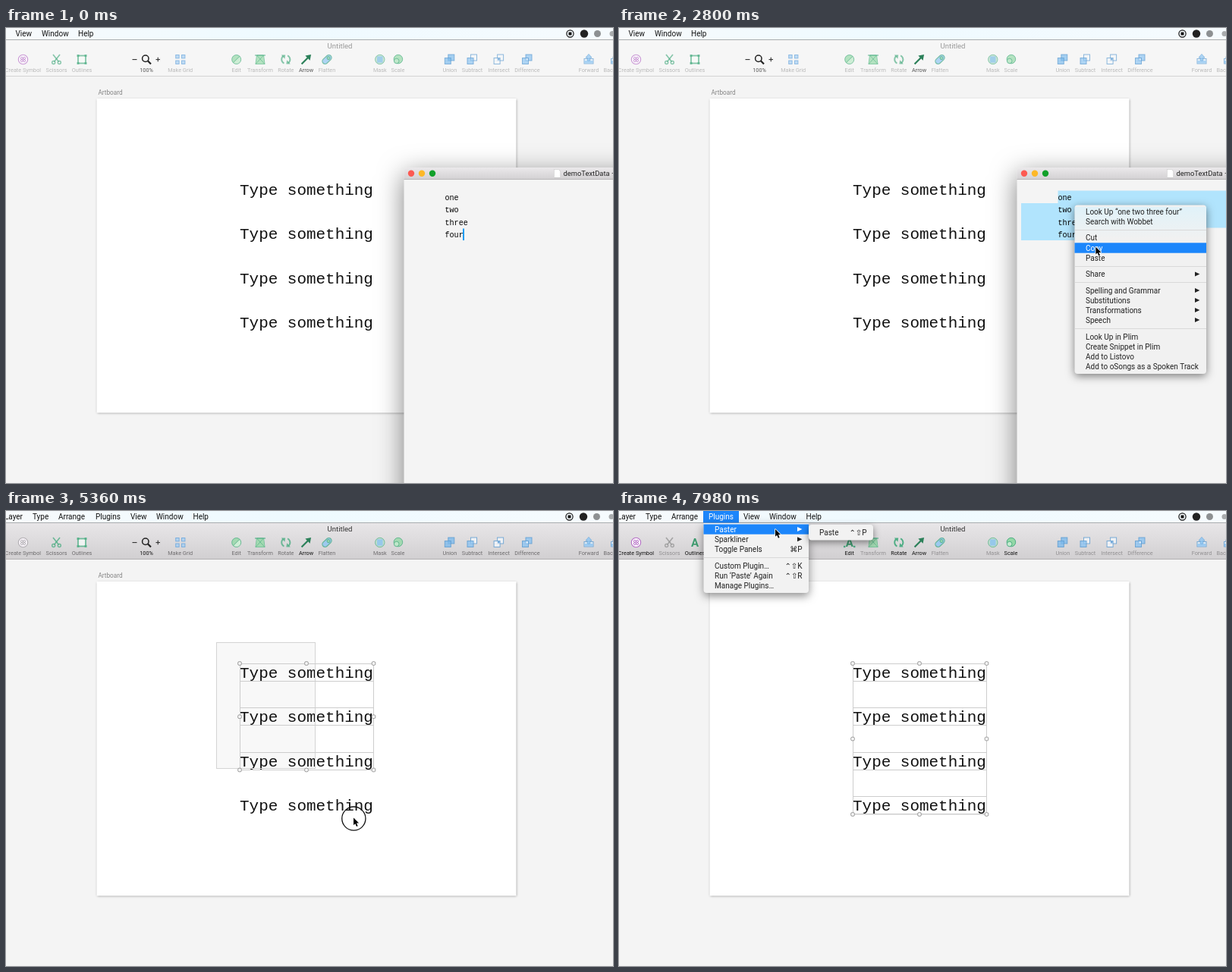
Recreate the animation shown at these times as an HTML page with a canvas. Size 800 by 600 pixels, loop 8 s.

```html
<!DOCTYPE html>
<html lang="en">
<head>
<meta charset="utf-8">
<title>Paste into text layers</title>
<style>
html, body { margin: 0; width: 100%; height: 100%; overflow: hidden; background: #f4f4f4; }
canvas { display: block; width: 800px; height: 600px; }
</style>
</head>
<body>
<canvas id="stage" width="800" height="600"></canvas>
<script>
const ctx = document.getElementById('stage').getContext('2d');
const LOOP = 8000;
const UI = 'Roboto, "DejaVu Sans", sans-serif';
const MONO = '"Liberation Mono", monospace';
const BLUE = '#1c86fb';
const GREEN = '#4fae85', LEAF = '#93d8a6', SKY = '#8cc4f2', STEEL = '#5d9bd0';

// pointer path: time, x, y
const PATH = [
  [820, 690, 330], [1100, 672, 300], [1620, 600, 233], [2160, 600, 233], [2180, 601, 236],
  [2500, 627, 286], [2700, 627, 286], [2860, 629, 290], [3480, 629, 290], [3640, 590, 282],
  [3840, 590, 282], [4060, 248.5, 209], [4960, 248.5, 209], [5070, 277, 173], [5080, 277, 173],
  [5480, 507, 467], [5620, 507, 467], [5940, 231, 245.5], [6440, 231, 245.5], [7060, 134, 7],
  [7300, 134, 7], [7740, 206, 24]
];
const START = { x: 277, y: 173 };
const LINE_Y = [201, 259.5, 318, 376.5];

const CONTEXT = [
  ['Look Up “one two three four”', 242], ['Search with Wobbet', 255],
  ['Cut', 276.5], ['Copy', 290], ['Paste', 303], ['Share', 324.5, 1],
  ['Spelling and Grammar', 346, 1], ['Substitutions', 359, 1],
  ['Transformations', 372, 1], ['Speech', 385, 1],
  ['Look Up in Plim', 407], ['Create Snippet in Plim', 420],
  ['Add to Listovo', 433], ['Add to oSongs as a Spoken Track', 446]
];
const PLUGINS = [
  ['Paster', 24, '▶'], ['Sparkliner', 37.3, '▶'], ['Toggle Panels', 50.5, '⌘P'],
  ['Custom Plugin…', 72, '⌃⇧K'], ['Run ‘Paste’ Again', 85.3, '⌃⇧R'], ['Manage Plugins…', 98.5]
];

const smooth = p => p * p * (3 - 2 * p);
const clamp = v => Math.max(0, Math.min(1, v));

function pointerAt(t) {
  let a = PATH[0];
  for (const b of PATH) {
    if (t < b[0]) {
      const p = smooth(clamp((t - a[0]) / (b[0] - a[0] || 1)));
      return { x: a[1] + (b[1] - a[1]) * p, y: a[2] + (b[2] - a[2]) * p };
    }
    a = b;
  }
  return { x: a[1], y: a[2] };
}

function text(str, x, y, size, color, align = 'left', family = UI, weight = 400) {
  ctx.font = `${weight} ${size}px ${family}`;
  ctx.fillStyle = color;
  ctx.textAlign = align;
  ctx.fillText(str, x, y);
}
function rect(x, y, w, h, fill) {
  ctx.fillStyle = fill;
  ctx.fillRect(x, y, w, h);
}
function box(x, y, w, h, stroke, fill, width = 1) {
  if (fill) rect(x, y, w, h, fill);
  ctx.lineWidth = width;
  ctx.strokeStyle = stroke;
  ctx.strokeRect(x, y, w, h);
}
function disc(x, y, r, fill, stroke, width = 1) {
  ctx.beginPath();
  ctx.arc(x, y, r, 0, 7);
  if (fill) { ctx.fillStyle = fill; ctx.fill(); }
  if (stroke) { ctx.lineWidth = width; ctx.strokeStyle = stroke; ctx.stroke(); }
}
function poly(pts, fill, stroke, width = 1, close = true) {
  ctx.beginPath();
  for (let i = 0; i < pts.length; i += 2) ctx.lineTo(pts[i], pts[i + 1]);
  if (close) ctx.closePath();
  if (stroke) { ctx.lineWidth = width; ctx.strokeStyle = stroke; ctx.stroke(); }
  if (fill) { ctx.fillStyle = fill; ctx.fill(); }
}
const line = (pts, color, width = 1) => poly(pts, null, color, width, false);
function fade(y0, y1, top, bottom) {
  const g = ctx.createLinearGradient(0, y0, 0, y1);
  g.addColorStop(0, top);
  g.addColorStop(1, bottom);
  return g;
}
function panel(x, y, w, h, r, fill, shadow, blur, dy) {
  ctx.save();
  ctx.shadowColor = shadow;
  ctx.shadowBlur = blur;
  ctx.shadowOffsetY = dy;
  ctx.fillStyle = fill;
  ctx.beginPath();
  ctx.roundRect(x, y, w, h, r);
  ctx.fill();
  ctx.restore();
}

// toolbar icons, drawn around 0,0
const squares = (back, front, mid) => () => {
  box(-2, -6.5, 8, 8, STEEL, back);
  box(-6.5, -2, 8, 8, STEEL, front);
  if (mid) rect(-1.5, -1.5, 2.5, 2.5, mid);
};
const letterA = () => text('A', 0, 5.5, 15, '#3f9c70', 'center', UI, 700);
const tray = () => {
  box(-6, -1, 12, 6.5, STEEL, '#e3f0fb');
  rect(-5.5, 1.5, 11, 3.5, SKY);
  poly([0, -7, 4, -2.5, 1.7, -2.5, 1.7, 1.5, -1.7, 1.5, -1.7, -2.5, -4, -2.5], SKY, STEEL);
};
const ICONS = {
  symbol(color) {
    disc(0, 0, 6.2, '#fbf6fc', color, 1.1);
    for (const [x, y] of [[-1.6, -1.6], [1.6, -1.6], [-1.6, 1.6], [1.6, 1.6]]) disc(x, y, 1.5, null, color, 0.9);
  },
  scissors() {
    line([-4.5, -6.5, 3, 3], GREEN, 1.6);
    line([4.5, -6.5, -3, 3], GREEN, 1.6);
    disc(-3.8, 4, 2, null, GREEN, 1.4);
    disc(3.8, 4, 2, null, GREEN, 1.4);
  },
  frame() {
    box(-5, -5, 10, 10, GREEN, '#f6fbf8', 1.8);
    for (const x of [-5, 5]) for (const y of [-5, 5]) rect(x - 1.5, y - 1.5, 3, 3, GREEN);
  },
  zoom() {
    rect(-18.5, -0.5, 6, 1.1, '#333');
    rect(12.5, -0.5, 5.5, 1.1, '#333');
    rect(14.7, -2.8, 1.1, 5.6, '#333');
    disc(-1.2, -1.2, 4.2, null, '#222', 1.5);
    line([1.8, 1.8, 6, 6], '#222', 2.2);
  },
  grid() {
    for (const x of [-6, 1.8]) for (const y of [-6, 1.5]) box(x, y, 4.4, 4.4, '#6ba6dc', '#a8d0f3');
  },
  half() {
    disc(0, 0, 6, LEAF, GREEN);
    ctx.beginPath();
    ctx.arc(0, 0, 5.5, -0.78, 2.36);
    ctx.fillStyle = '#d9f1de';
    ctx.fill();
    line([-4, 4, 4, -4], GREEN);
  },
  editText() {
    letterA();
    for (const x of [-6.5, 6.5]) for (const y of [-5.5, 5.5]) rect(x - 1.2, y - 1.2, 2.4, 2.4, GREEN);
  },
  trapezoid() {
    poly([-4.5, -5.5, 4.5, -5.5, 6, 6, -6, 6], LEAF, GREEN);
    line([-4.5, -5.5, 6, 6], GREEN, 0.8);
    line([4.5, -5.5, -6, 6], GREEN, 0.8);
    line([-7, -5.5, 7, -5.5], GREEN, 1.4);
  },
  rotate() {
    for (const turn of [0, Math.PI]) {
      ctx.save();
      ctx.rotate(turn);
      ctx.beginPath();
      ctx.arc(0, 0, 5.6, 2, 4.1);
      ctx.lineWidth = 2;
      ctx.strokeStyle = GREEN;
      ctx.stroke();
      poly([-6, -6, -0.6, -6, -1.4, -0.8], GREEN);
      ctx.restore();
    }
  },
  arrow() {
    line([-6, 6, 3, -3], '#2b8059', 2.2);
    poly([6.5, -6.5, 5, 1.2, -1.2, -5], '#2b8059');
  },
  capsule() {
    ctx.save();
    ctx.rotate(-0.75);
    ctx.beginPath();
    ctx.roundRect(-7, -3.6, 14, 7.2, 3.6);
    ctx.fillStyle = SKY;
    ctx.fill();
    ctx.strokeStyle = GREEN;
    ctx.lineWidth = 1.2;
    ctx.stroke();
    disc(2.8, 0, 2, LEAF, GREEN);
    ctx.restore();
  },
  mask() {
    disc(0, 0, 6.2, '#b9dec9', GREEN, 0.9);
    rect(-3.8, -4.2, 7.6, 8.4, SKY);
  },
  scale() {
    disc(0.4, -0.4, 5.8, LEAF, GREEN);
    disc(-1.8, 2, 3.3, '#c5ead0', GREEN);
  },
  union: squares('#7dbbed', '#7dbbed'),
  subtract: squares('#f4f7fa', SKY),
  intersect: squares('#f4f7fa', '#f4f7fa', '#4e94d4'),
  difference: squares(SKY, SKY, '#f4f7fa'),
  tray
};
const TOOLS = [
  ['Create Symbol', 22.5, 'symbol', 1], ['Scissors', 66.5, 'scissors'], ['Outlines', 100, 'frame', 1],
  ['100%', 185, 'zoom', 2], ['Make Grid', 229.7, 'grid'], ['Edit', 303.7, 'half', 1],
  ['Transform', 335, 'trapezoid'], ['Rotate', 368.8, 'rotate', 1], ['Arrow', 395.6, 'arrow', 2],
  ['Flatten', 423, 'capsule'], ['Mask', 492.8, 'mask'], ['Scale', 516.5, 'scale', 1],
  ['Union', 584.8, 'union'], ['Subtract', 614.5, 'subtract'], ['Intersect', 649.6, 'intersect'],
  ['Difference', 687, 'difference'], ['Forward', 768, 'tray'], ['Backward', 803.5, 'tray']
];

function toolbar(active, ready) {
  rect(0, 16, 800, 48, active ? fade(16, 64, '#e8e6e8', '#d1cfd1') : '#f6f6f6');
  rect(0, 63, 800, 1, active ? '#b3b1b3' : '#d4d4d4');
  text('Untitled', 440, 27, 9.6, active ? '#333' : '#999', 'center');
  for (const [label, x, icon, kind] of TOOLS) {
    const on = kind === 2 || (ready && kind === 1);
    let name = icon;
    if (ready && icon === 'frame') name = 'A';
    if (ready && icon === 'half') name = 'editText';
    ctx.save();
    ctx.translate(x, 41.5);
    ctx.globalAlpha = on ? 1 : active ? 0.8 : 0.68;
    if (ready && icon === 'scissors') ctx.filter = 'grayscale(1)';
    if (name === 'A') letterA();
    else ICONS[name](active && !ready ? '#a5a2a6' : '#b56fc6');
    ctx.restore();
    const color = on ? (active ? '#111' : '#555') : active ? (ready ? '#929092' : '#6e6c6e') : '#bababa';
    text(label, x, 58, 7.3, color, 'center');
  }
}

function menuBar(t, design, open) {
  const g = ctx.createLinearGradient(0, 0, 800, 0);
  g.addColorStop(0, '#f7fafc');
  g.addColorStop(0.45, '#eefaff');
  g.addColorStop(1, '#f6fbfe');
  rect(0, 0, 800, 16, g);
  rect(0, 15, 800, 1, '#a9acae');
  if (open) rect(111, 0, 47, 15.5, BLUE);
  const items = design
    ? [['Type', 35], ['Arrange', 69], ['Plugins', 118], ['View', 164], ['Window', 198], ['Help', 246.5]]
    : [['View', 12.5], ['Window', 47], ['Help', 95]];
  if (design) text('Layer', 22, 11, 10, '#111', 'right');
  for (const [s, x] of items) text(s, x, 11, 10, open && s === 'Plugins' ? '#fff' : '#111');
  const dx = t < 2700 ? 1 : 0;
  disc(742.5 + dx, 7.5, 4.6, null, '#111', 1.2);
  rect(740.5 + dx, 5.5, 4, 4, '#111');
  disc(761 + dx, 7.5, 5.2, '#222');
  disc(778.5 + dx, 7.5, 4.5, '#8d9092');
  disc(798 + dx, 7.5, 3.5, '#a9acae');
}

function artboard() {
  text('Artboard', 121.5, 88, 8.2, '#858585');
  panel(119.5, 93, 553, 414.5, 0, '#fff', 'rgba(0,0,0,.5)', 3, 0.8);
  for (const y of LINE_Y) text('Type something', 308, y + 18.5, 20.95, '#111', 'left', MONO);
}

function selection(count) {
  if (!count) return;
  const last = LINE_Y[count - 1] + 23.5;
  for (const y of LINE_Y.slice(0, count)) box(308.5, Math.floor(y) + 0.5, 176, 23, '#cdcdcd');
  box(308.5, 201.5, 176, last - 201.5, '#cdcdcd');
  for (const y of [201, (201 + last) / 2, last]) {
    for (const x of [308, 396, 484.5]) {
      if (x === 396 && y !== 201 && y !== last) continue;
      ctx.beginPath();
      ctx.roundRect(x - 2.3, y - 2.3, 4.6, 4.6, 1.4);
      ctx.fillStyle = '#f5f5f5';
      ctx.fill();
      ctx.lineWidth = 1;
      ctx.strokeStyle = '#999';
      ctx.stroke();
    }
  }
}

function editor(t) {
  panel(524.5, 184, 330, 470, 5, '#f4f4f4', 'rgba(0,0,0,.5)', 34, 9);
  ctx.beginPath();
  ctx.roundRect(524.5, 184, 330, 16, [5, 0, 0, 0]);
  ctx.fillStyle = fade(184, 200, '#ebe9eb', '#d2d0d2');
  ctx.fill();
  rect(524.5, 199, 276, 1, '#b9b7b9');
  disc(534, 191.7, 4.2, '#fc5a52');
  disc(548, 191.7, 4.2, '#fdb827');
  disc(562, 191.7, 4.2, '#12a02a');
  poly([722.5, 186.5, 728, 186.5, 730.5, 189, 730.5, 197, 722.5, 197], '#fff', '#bbb');
  text('demoTextData — Edited', 734.5, 195, 9.4, '#222');
  if (t >= 1060) {
    const tint = '#b1e4fd';
    rect(578.5, 214.5, 222, 17, tint);
    rect(530, 231, 270, 32.5, tint);
    rect(530, 263, 73, 17, tint);
  }
  ['one', 'two', 'three', 'four'].forEach((s, i) =>
    text(s, 578.5, 227 + i * 16.3, 10.1, '#000', 'left', MONO));
  if (t < 1060) {
    ctx.globalAlpha = t < 820 ? 1 - clamp((t - 10) / 310) : clamp((t - 810) / 220);
    rect(602, 264.5, 2, 15.5, '#1a9cf2');
    ctx.globalAlpha = 1;
  }
}

function triangle(x, y, color) {
  poly([x - 3, y - 3, x + 3.4, y, x - 3, y + 3], color);
}

function contextMenu(alpha, my) {
  ctx.save();
  ctx.globalAlpha = alpha;
  panel(600.5, 233.5, 173.5, 222.5, 4, '#f1f1f1', 'rgba(0,0,0,.5)', 12, 3);
  rect(601, 236, 173, 42, fade(236, 278, '#e0f2f9', '#f1f1f1'));
  for (const y of [266, 314, 335, 396]) rect(601, y, 173, 1, '#d9d9d9');
  for (const [s, y, sub] of CONTEXT) {
    const hot = my >= y - 6.9 && my < y + 6.4;
    if (hot) rect(600.5, y - 6.7, 173.5, 13.4, BLUE);
    text(s, 615, y + 3.5, 10, hot ? '#fff' : '#222');
    if (sub) triangle(762, y, '#222');
  }
  ctx.restore();
}

function pluginMenu(t, my) {
  panel(111.5, 16, 138.5, 92, [0, 0, 4, 4], '#f2f2f2', 'rgba(0,0,0,.45)', 12, 4);
  rect(112, 61, 138, 1, '#d9d9d9');
  for (const [s, y, extra] of PLUGINS) {
    const hot = my > 17 && Math.abs(my - y) < 6.7;
    const color = hot ? '#fff' : '#222';
    if (hot) rect(111.5, y - 6.5, 138.5, 13.2, BLUE);
    text(s, 126, y + 3.5, 10, color);
    if (extra === '▶') triangle(238, y, color);
    else if (extra) text(extra, 241.5, y + 3.5, 10, color, 'right');
  }
  if (t >= 7940) {
    panel(250, 18, 85, 20.5, 4, '#f2f2f2', 'rgba(0,0,0,.45)', 10, 3);
    text('Paste', 264, 32, 10, '#222');
    text('⌃⇧P', 326.5, 32, 10, '#222', 'right');
  }
}

function pointer(x, y, beam, pressed) {
  ctx.save();
  ctx.translate(x, y);
  if (beam) {
    line([-2.5, -6, 0, -5, 2.5, -6], '#222');
    line([0, -5, 0, 5], '#222');
    line([-2.5, 6, 0, 5, 2.5, 6], '#222');
  } else {
    if (pressed) disc(0.3, 1.2, 15.6, null, '#111', 1.3);
    ctx.lineJoin = 'round';
    poly([0, 0, 0, 9.8, 2.2, 7.8, 3.9, 11.7, 5.6, 11, 4, 7.2, 7, 7], '#000', '#fff', 1.6);
  }
  ctx.restore();
}

function draw(t) {
  const m = pointerAt(t);
  const design = t >= 4080, active = t >= 4160, open = t >= 7080;
  const dragging = t >= 5080 && t < 5600;
  rect(0, 0, 800, 600, '#f4f4f4');
  toolbar(active, t >= 6480);
  artboard();

  let picked = t >= 5600 ? 4 : 0;
  if (dragging) {
    // the marquee trails the pointer
    const q = pointerAt(Math.max(5080, t - 64));
    picked = q.x > 308 ? LINE_Y.filter(y => q.y > y).length : 0;
    if (q.x > START.x) {
      box(START.x + 0.5, START.y + 0.5, Math.round(q.x - START.x), Math.round(q.y - START.y),
        '#d4d4d4', 'rgba(0,0,0,.028)');
    }
  }
  selection(picked);

  if (!design) editor(t);
  if (t >= 1640 && t < 3460) contextMenu(t < 3360 ? 1 : 1 - (t - 3350) / 110, m.y);
  menuBar(t, design, open);
  if (open) pluginMenu(t, m.y);
  if (t >= 820) pointer(m.x, m.y, t < 1640, dragging || (t >= 4060 && t < 4180));
}

const origin = performance.now();
function tick() {
  draw((performance.now() - origin) % LOOP);
  requestAnimationFrame(tick);
}
tick();
</script>
</body>
</html>
```
